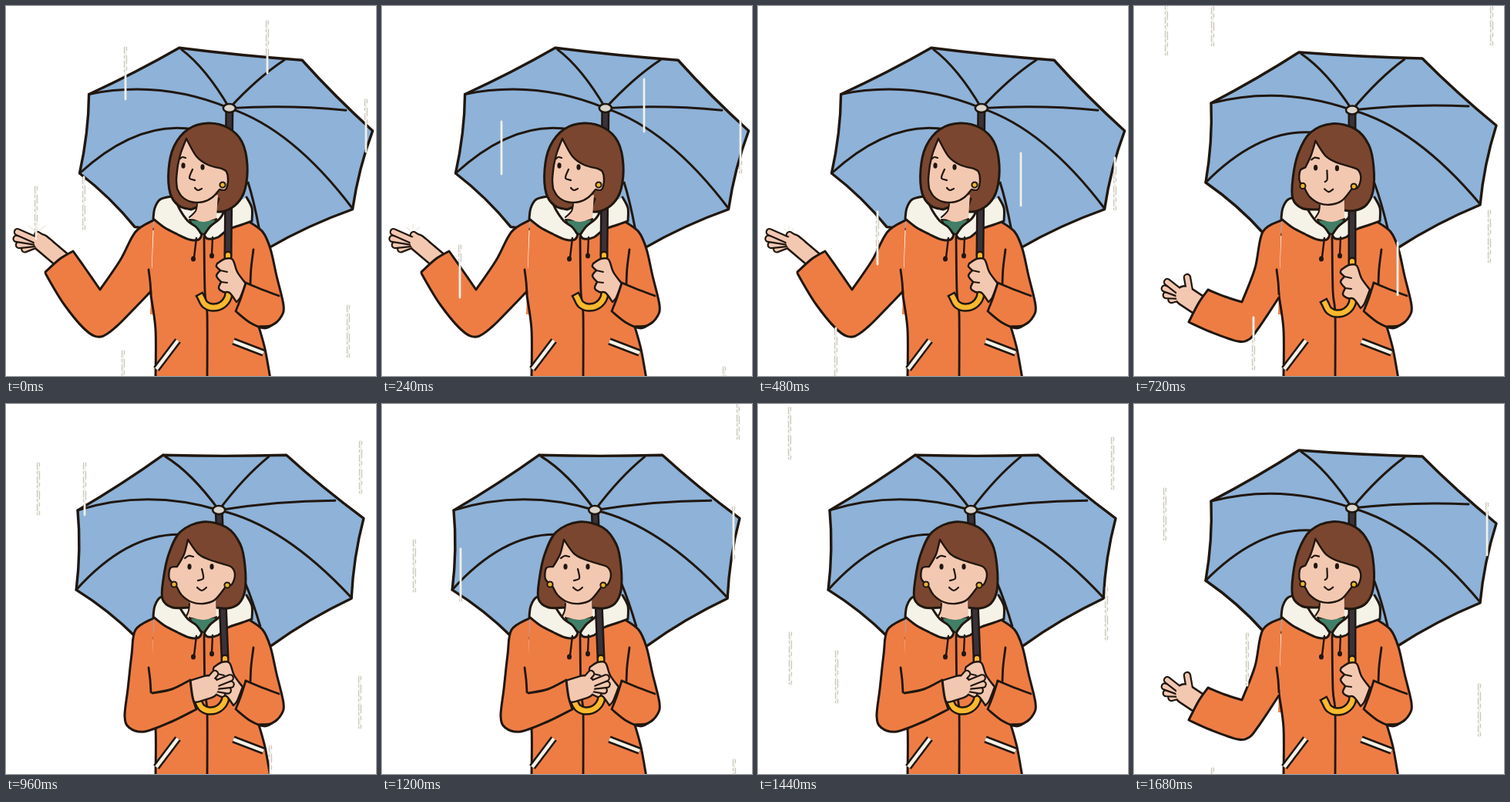
An HTML page with a canvas that plays this animation: 480 px wide and 480 px high, repeating every 1.92 s.

```html
<!DOCTYPE html>
<html lang="en">
<head>
<meta charset="utf-8">
<title>Rainy day</title>
<style>
html, body { margin: 0; width: 100%; height: 100%; overflow: hidden; background: #fff; }
canvas { display: block; width: 480px; height: 480px; }
</style>
</head>
<body>
<canvas id="stage" width="480" height="480"></canvas>
<script>
const ctx = document.getElementById('stage').getContext('2d');
const INK = '#20170f', BLUE = '#8eb2d8', ORANGE = '#ee7d44', HAIR = '#7b462f', SKIN = '#f3c8b1',
  CREAM = '#f5f2e8', GREEN = '#427f68', YELLOW = '#fbb92e', SHAFT = '#39323a', RAIN = '#f1efe8';
const STEP = 240, COUNT = 8, GRAVITY = 20;

// Points are written "x,y"; "!" marks a sharp corner.
const parse = text => text.split(' ').map(t => {
  const [x, y] = t.split(',').map(parseFloat);
  return { x, y, sharp: t.endsWith('!') };
});

function mix(from, to, t) {
  const end = parse(to);
  return parse(from).map((p, i) => ({
    x: p.x + (end[i].x - p.x) * t, y: p.y + (end[i].y - p.y) * t, sharp: p.sharp
  }));
}

function curve(shape) {
  const pts = typeof shape === 'string' ? parse(shape) : shape;
  const path = new Path2D();
  path.moveTo(pts[0].x, pts[0].y);
  for (let i = 1; i < pts.length; i++) {
    const a = pts[i - 1], b = pts[i];
    const p = a.sharp || i < 2 ? a : pts[i - 2];
    const n = b.sharp || i === pts.length - 1 ? b : pts[i + 1];
    path.bezierCurveTo(a.x + (b.x - p.x) / 6, a.y + (b.y - p.y) / 6,
      b.x - (n.x - a.x) / 6, b.y - (n.y - a.y) / 6, b.x, b.y);
  }
  return path;
}

function stroke(path, width, color = INK) {
  ctx.lineWidth = width;
  ctx.strokeStyle = color;
  ctx.stroke(path);
}

function fill(path, color, line = 3) {
  ctx.fillStyle = color;
  ctx.fill(path);
  if (line) stroke(path, line);
}

const shape = (pts, color, line) => fill(curve(pts), color, line);
const line = (pts, width = 2.8) => stroke(curve(pts), width);

function segment(x1, y1, x2, y2) {
  const path = new Path2D();
  path.moveTo(x1, y1);
  path.lineTo(x2, y2);
  return path;
}

function tube(path, width, color, rim = 2.5) {
  stroke(path, width + 2 * rim);
  stroke(path, width, color);
}

function dot(x, y, rx, ry, color = INK, rim = 0) {
  const path = new Path2D();
  path.ellipse(x, y, rx, ry, 0, 0, Math.PI * 2);
  fill(path, color, rim);
}

// tilt: umbrella angle; turn: head from side (0) to front (1); grip: top of the handle.
const reach = {
  tilt: 0.05, turn: 0, grip: [288, 322],
  arm: '191,278 168,293 148,330 122,368! 104,342 87,318! 70,328 51,345! 54,352 76,388 104,421 123,429 143,416 165,394 188,370',
  hand: { wrist: [72, 329], palm: [46, 307], width: 19, angle: 204, fan: -15, len: 37, thumb: [41, 297] }
};
const open = {
  tilt: 0, turn: 0.7, grip: [283, 330],
  arm: '191,278 167,293 157,340 140,384! 118,377 96,368! 84,385 71,410! 100,423 135,435 150,432 160,420 175,398 188,378',
  hand: { wrist: [84, 388], palm: [66, 376], width: 23, angle: 218, fan: -18, len: 32, thumb: [69, 352] }
};
const hold = {
  tilt: -0.05, turn: 1, grip: [284, 329],
  arm: '191,278 168,293 163,325 158,370 154,405 160,420 180,425 215,412 247,396! 242,380 239,358! 215,370 190,375',
  hand: { wrist: [246, 372], palm: [262, 367], width: 27, angle: -22, fan: 16, len: 34, thumb: [271, 350] }
};
const poses = [reach, reach, reach, open, hold, hold, hold, open];

// Each drop: x, first step, y, speed, steps alive, sideways drift per step.
const drops = [
  [155, 0, 53, 97, 4, 0], [339, 0, 19, 76, 5, 1], [467, 0, 121, 28, 6, -2],
  [101, 0, 222, 88, 3, 0], [444, 0, 388, 80, 2, 0], [42, 3, -4, 80, 4, 0],
  [102, 3, -16, 92, 5, 0], [464, 3, -17, 65, 5, -4], [41, 6, 4, 105, 3, -1],
  [462, 5, -22, 65, 3, -2], [147, 7, 297, 150, 2, 5]
];

function rainAt(step) {
  const found = [];
  for (const [x, first, y, speed, life, drift] of drops) {
    const age = (step - first + COUNT) % COUNT;
    if (age >= life) continue;
    const top = y + speed * age + GRAVITY * age * (age - 1) / 2;
    found.push([x + drift * age, top, top + 68]);
  }
  return found;
}

function umbrella(tilt) {
  const hub = { x: 283, y: 135 }, sag = 0.03;
  const corners = parse('214,60 374,68 470,155 449,258 342,314 168,295 93,229 100,126');
  const canopy = new Path2D();
  canopy.moveTo(corners[0].x, corners[0].y);
  corners.forEach((a, i) => {
    const b = corners[(i + 1) % corners.length], mx = (a.x + b.x) / 2, my = (a.y + b.y) / 2;
    canopy.quadraticCurveTo(mx + (hub.x - mx) * sag, my + (hub.y - my) * sag, b.x, b.y);
  });
  const rib = (x, y, lift, from = hub) => {
    const path = segment(from.x, from.y, from.x, from.y);
    path.quadraticCurveTo((from.x + x) / 2, (from.y + y) / 2 - lift, x, y);
    stroke(path, 3);
  };
  ctx.save();
  ctx.translate(334, 272);
  ctx.rotate(tilt);
  ctx.translate(-334, -272);
  fill(canopy, BLUE, 3.4);
  rib(217, 62, 14);
  rib(351, 69, 8);
  rib(434, 130, 6);
  rib(449, 257, 38);
  rib(100, 126, 28);
  rib(93, 229, 42, { x: 240, y: 165 });
  rib(329, 288, 6, { x: 312, y: 230 });
  ctx.restore();
}

function pole({ tilt, grip }) {
  const x = 283 + 137 * tilt, y = 135 - 51 * tilt;
  tube(segment(x, y, ...grip), 6, SHAFT);
  return [x, y];
}

function coat() {
  shape('192,278! 318,280! 330,400! 187,400!', ORANGE, 0);
  shape('185,342 188,375 194,420 194,484! 343,484! 336,445 328,416! 345,414 357,403 360,388 351,350 343,315 333,293 314,279', ORANGE);
  line('321,316 318,340 317,361');
  line('257,300 258,370 261,400 261,482');
  ctx.lineCap = 'butt';
  tube(segment(195, 471, 223, 434), 4.5, CREAM);
  tube(segment(295, 435, 334, 450), 4.5, CREAM);
  ctx.lineCap = 'round';
  shape('207,252! 312,252! 290,286 257,298 220,284!', CREAM, 0);
  shape('238,277 256,278 273,276! 268,290 258,297! 246,290 238,277!', GREEN, 2);
  shape('215,247! 200,251 193,262 191,276! 205,287 222,296 238,303 250,303 254,297! 247,287 236,279 226,265 220,252', CREAM);
  shape('312,248! 319,262 319,279! 305,284 288,290 275,300 262,302 257,297! 265,286 278,275 285,262', CREAM);
  line('247,301 244,326', 2.4);
  line('268,300 267,322', 2.4);
  dot(243, 328, 3, 3.6);
  dot(267, 324, 3, 3.6);
}

function head(turn) {
  const at = (side, front) => mix(side, front, turn);
  const ring = p => dot(p.x, p.y, 3.6, 3.6, '#e9b52c', 2);
  shape(at('240,264! 224,259 213,243 211,212 218,182 236,160 262,152 288,158 306,176 313,206 310,238 300,256 284,266 270,267! 276,250! 240,264!',
    '238,264! 216,264 203,253 204,228 211,195 226,166 255,153 286,160 304,182 310,210 310,242 302,259 288,265 272,264! 270,250! 238,264!'), HAIR);
  shape(at('249,250! 247,262 238,274! 256,280 273,275! 275,245!',
    '238,250! 238,262 234,275! 256,280 273,275! 272,245!'), SKIN, 0);
  line(at('248,257 246,266 238,274', '238,259 237,268 234,275'), 2);
  shape(at('234,172! 227,190 223,206! 222,214 221,226 222,237! 228,247 240,254 256,254 268,248 277,238! 285,238 288,226 286,215 280,211! 262,206 247,195 234,172!',
    '236,176! 231,195 222,211! 213,213 212,227 221,236! 228,248 241,257 256,259 271,254 285,237! 293,234 297,222 293,212 283,208! 264,202 249,194 236,176!'), SKIN, 2.4);
  for (const eye of at('230,207 255,209', '238,211 267,211')) dot(eye.x, eye.y, 2.6, 3.8);
  line(at('226,198 229,196 233,197', '232,200 237,197 243,198'), 2.2);
  line(at('242,212 238,223 245,226', '254,214 256,226 249,229'), 2.2);
  line(at('245,236 249,239 254,237', '248,238 254,242 260,238'), 2.2);
  const [left, right] = at('221,232 281,232', '218,234 287,235');
  if (turn) ring(left);
  ring(right);
}

function fist([x, y]) {
  ctx.save();
  ctx.translate(x - 288, y - 322);
  tube(segment(288, 323, 288, 334), 6, YELLOW);
  ctx.lineCap = 'square';
  tube(curve('289,364 288,378 280,388 268,391 258,387 253,378'), 6.5, YELLOW);
  ctx.lineCap = 'round';
  shape('274,334 284,328 294,329 300,345 311,360! 304,378 299,384! 290,372 282,371 276,366 279,358! 273,350 278,343! 273,338 274,334', SKIN, 2.5);
  line('278,343 287,345', 2);
  line('279,358 287,359', 2);
  ctx.restore();
  line('311,359! 305,378 298,396! 317,411 336,418 350,411');
  line('311,359 330,367 354,376');
}

function hand({ wrist, palm: [x, y], width, angle, fan, len, thumb }) {
  const palm = segment(...wrist, x, y);
  stroke(palm, width + 5);
  tube(segment(x + (wrist[0] - x) * 0.4, y, ...thumb), 6, SKIN, 2.2);
  for (let i = 3; i >= 0; i--) {
    const a = (angle + fan * i) * Math.PI / 180, r = len - i * i * 1.2 - 3;
    tube(segment(x, y, x + r * Math.cos(a), y + r * Math.sin(a)), 6, SKIN, 2.2);
  }
  stroke(palm, width, SKIN);
}

function rimRain(list) {
  ctx.lineCap = 'butt';
  for (const [x, top, end] of list) {
    for (const side of [-1.6, 1.6]) {
      ctx.setLineDash(side < 0 ? [9, 2, 4, 3] : [5, 6, 11, 4]);
      stroke(segment(x + side, top, x + side, end), 1, '#aaa79d');
    }
  }
  ctx.setLineDash([]);
  ctx.lineCap = 'round';
}

function splash(size) {
  for (const turn of [-0.9, 0, 0.9]) {
    const dx = Math.sin(turn), dy = -Math.cos(turn);
    stroke(segment(40 + dx * 5, 294 + dy * 5, 40 + dx * size, 294 + dy * size), 2, RAIN);
  }
}

function render(step) {
  const pose = poses[step], rain = rainAt(step);
  ctx.fillStyle = '#fff';
  ctx.fillRect(0, 0, 480, 480);
  ctx.lineCap = ctx.lineJoin = 'round';
  rimRain(rain);
  umbrella(pose.tilt);
  coat();
  const [x, y] = pole(pose);
  dot(x, y, 8, 5.5, '#d9d5cd', 2.6);
  head(pose.turn);
  fist(pose.grip);
  hand(pose.hand);
  shape(pose.arm, ORANGE);
  line('185,342 187,358 188,374');
  for (const [rx, top, end] of rain) stroke(segment(rx, top, rx, end), 2.8, RAIN);
  if (pose === reach) splash(14 - 3 * step);
}

let shown = -1;
function tick() {
  const step = Math.floor(performance.now() / STEP) % COUNT;
  if (step !== shown) render(shown = step);
  requestAnimationFrame(tick);
}
tick();
</script>
</body>
</html>
```
